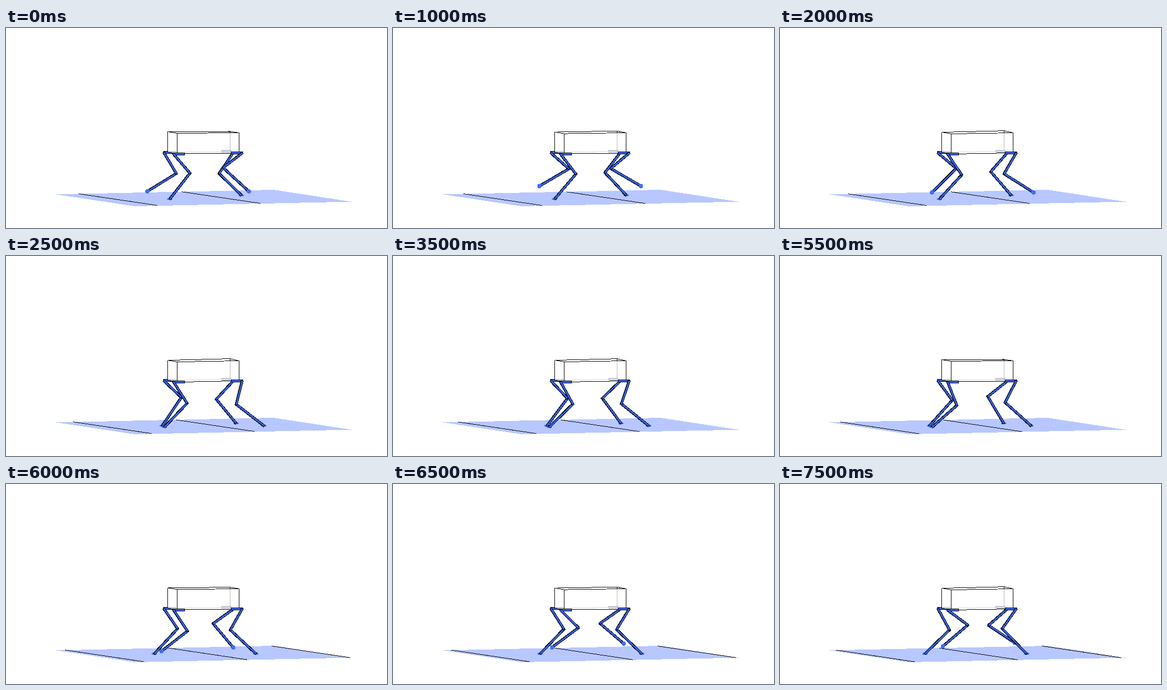
An HTML page that plays this animation: 720 px wide and 377 px high, repeating every 8 s.

```html
<!DOCTYPE html>
<html lang="en">
<head>
<meta charset="utf-8">
<title>Walking robot</title>
<style>
  html, body { margin: 0; width: 100%; height: 100%; overflow: hidden; background: #fff; }
  svg { display: block; width: 720px; height: 377px; }
</style>
</head>
<body>
<svg id="stage" viewBox="0 0 720 377" shape-rendering="crispEdges"></svg>
<script>
const LOOP = 8000, STEP = 500;
const CYCLE = 12, SWING = 3; // seconds per gait cycle and per foot swing
const BLUE = '#3b68f0', FOOT = '#3f6eff', GROUND = '#b8c7ff';
const stage = document.getElementById('stage');

// Diagonal pairs swing together, half a cycle apart.
const pairA = { liftTime: -0.55, stride: 38.5, height: 22 };
const pairB = { liftTime: 5.6, stride: 36, height: 18 };

// start: where the foot leaves the ground; bend: side of the knee
const legs = {
  rearFar: { ...pairA, hip: [299, 236], thigh: 44.5, shin: 64.5, bend: 1, start: [257, 320], bar: [297, 322, 234] },
  rearNear: { ...pairB, hip: [317, 238], thigh: 47, shin: 62, bend: 1, start: [287, 322.5], bar: [315, 338, 237.5] },
  frontFar: { ...pairB, hip: [428, 237], thigh: 45, shin: 59, bend: -1, start: [422.5, 315.5], bar: [407, 426, 232.5] },
  frontNear: { ...pairA, hip: [446, 236], thigh: 45, shin: 66, bend: -1, start: [449, 320], bar: [425, 448, 235.5] }
};

const line = (x1, y1, x2, y2, color = '#000', width = 1) =>
  `<line x1="${x1}" y1="${y1}" x2="${x2}" y2="${y2}" stroke="${color}" stroke-width="${width}"/>`;
const poly = (points, fill, stroke = 'none') =>
  `<polygon points="${points.join(' ')}" fill="${fill}" stroke="${stroke}"/>`;

function footAt({ liftTime, stride, height, start: [x, y] }, t) {
  const phase = (t - liftTime + CYCLE) % CYCLE;
  if (phase >= SWING) return [x + stride * (CYCLE - phase) / (CYCLE - SWING), y, 0];
  const k = phase / SWING, lift = height * Math.sin(Math.PI * k);
  return [x + stride * (k + 0.08 * Math.sin(2 * Math.PI * k)), y - lift, lift];
}

function kneeAt({ hip: [hx, hy], thigh, shin, bend }, fx, fy) {
  const dist = Math.hypot(fx - hx, fy - hy);
  const ux = (fx - hx) / dist, uy = (fy - hy) / dist;
  const a = (thigh ** 2 - shin ** 2 + dist ** 2) / (2 * dist);
  const h = bend * Math.sqrt(Math.max(0, thigh ** 2 - a * a));
  return [hx + ux * a + uy * h, hy + uy * a - ux * h];
}

function beam(x1, y1, x2, y2) {
  const len = Math.hypot(x2 - x1, y2 - y1);
  const ux = (x2 - x1) / len, uy = (y2 - y1) / len;
  return line(x1 - ux * 2, y1 - uy * 2, x2 + ux, y2 + uy, '#000', 5.3) +
    line(x1 - ux, y1 - uy, x2, y2, BLUE, 3.4) +
    line(x1 - uy, y1 + ux, x2 - uy, y2 + ux, 'rgba(0,0,0,.7)', 0.8);
}

function drawLeg(leg, t) {
  const [fx, fy, lift] = footAt(leg, t);
  const [kx, ky] = kneeAt(leg, fx, fy);
  const lifted = lift > 3;
  const foot = `<ellipse cx="${fx}" cy="${fy}" rx="${lifted ? 4 : 5}" ry="${lifted ? 4 : 2}" fill="${FOOT}"/>`;
  const [left, right, y] = leg.bar;
  const bar = line(left, y, right, y, '#000', 5) + line(left + 1, y, right - 1, y, BLUE, 3);
  const shin = beam(kx, ky, fx, fy);
  return bar + (lifted ? shin + foot : foot + shin) + beam(...leg.hip, kx, ky);
}

function drawGround(t) {
  let out = poly([94, 313.5, 506, 305, 653, 327.5, 243, 336], GROUND);
  for (let i = 0; i < 3; i++) {
    const far = 137 - 4.13 * t + 194.7 * i, near = 286 - 4.27 * t + 195 * i;
    if (far < 503.5) out += line(far, 313.3 - (far - 95) / 51, near, 335.3 - (near - 243) / 51);
  }
  return out;
}

function drawBody(t) {
  const sway = 1.4 * Math.abs(Math.sin(Math.PI * t / 5.5));
  const top = [[306, 195.5 + sway * 0.8], [324, 198.5 + sway * 0.8], [440.5, 197.5], [423.5, 195 - sway]];
  const base = [[305.5, 234], [323.5, 236.5 + sway * 0.8], [440.5, 236.5 - sway * 0.8], [423.5, 233 - sway * 0.6]];
  const edge = (p, q, color) => line(...p, ...q, color);
  const veil = 'rgba(255,255,255,.72)';
  return edge(top[3], base[3]) + edge(base[0], base[3], '#777') + edge(base[3], base[2], '#777') +
    poly([top[0], top[1], base[1], base[0]], veil) + poly([top[1], top[2], base[2], base[1]], veil) +
    poly(top, 'none', '#000') +
    [0, 1, 2].map(i => edge(top[i], base[i])).join('') +
    edge(base[0], base[1]) + edge(base[1], base[2]);
}

function render(t) {
  stage.innerHTML = drawGround(t) + drawLeg(legs.rearFar, t) + drawLeg(legs.frontFar, t) +
    drawBody(t) + drawLeg(legs.rearNear, t) + drawLeg(legs.frontNear, t);
}

const start = performance.now();
let shown = -1;
function tick() {
  const step = Math.floor((performance.now() - start) % LOOP / STEP);
  if (step !== shown) render((shown = step) * STEP / 1000);
  requestAnimationFrame(tick);
}
tick();
</script>
</body>
</html>
```
